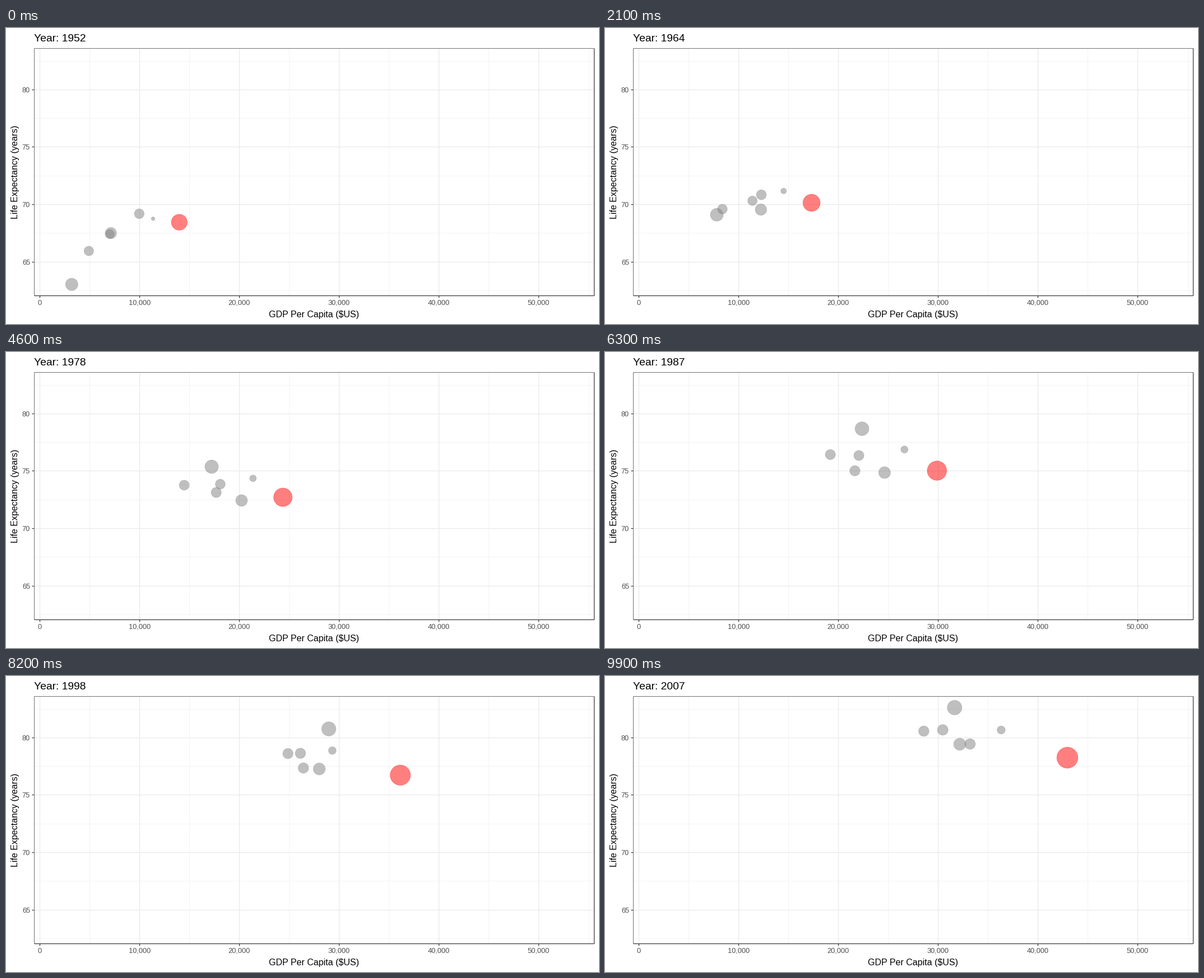
A matplotlib script that plays this animation: 1058x529 px, repeating every 10000 ms.

```python
import numpy as np
import matplotlib.pyplot as plt
from matplotlib.animation import FuncAnimation

W, H, DPI = 1058, 529, 64
FRAMES, INTERVAL = 100, 100
START, END = 1952, 2007
LEFT, RIGHT, TOP, BOTTOM = 50.2, 1049.3, 36.3, 478.3
X_MIN, X_MAX = -550, 55550
Y_MIN, Y_MAX = 62.051, 83.582
GREY, RED = (0.5, 0.5, 0.5), (1, 0, 0)

plt.rcParams["font.family"] = "Liberation Sans"
plt.rcParams["toolbar"] = "None"


def pt(px):
    return px * 72 / DPI


def px_x(v):
    return LEFT + (v - X_MIN) / (X_MAX - X_MIN) * (RIGHT - LEFT)


def px_y(v):
    return BOTTOM - (v - Y_MIN) / (Y_MAX - Y_MIN) * (BOTTOM - TOP)


class Country:
    """Key values joined by steady growth between the turning years."""
    gdp_years = (START, 1972, 1987, 1997, END)
    life_years = (START, 1972, 1987, END)
    slumps = np.array([1962, 1982, 1992])

    def __init__(self, gdp, life, people, slump=0, color=GREY):
        self.log_gdp, self.life, self.people = np.log(gdp), life, people
        self.slump, self.color = slump, color

    def x(self, t):
        depth = max(0, 1 - abs(self.slumps - t).min() / 5)
        return px_x(np.exp(np.interp(t, self.gdp_years, self.log_gdp)) - self.slump * depth)

    def y(self, t):
        return px_y(np.interp(t, self.life_years, self.life))

    def diameter(self, t):
        people = np.interp(t, (START, END), self.people)
        return 6.5 + 31.1 * np.sqrt((people - 14.8) / (301.1 - 14.8))


countries = [
    # Canada, France, Germany, Italy, Japan, United Kingdom, United States
    Country((11367, 18971, 26627, 28955, 36319), (68.75, 72.88, 76.86, 80.65), (14.8, 33.4), 1200),
    Country((7030, 16107, 22066, 25890, 30470), (67.41, 72.38, 76.34, 80.66), (42.5, 61.1)),
    Country((7144, 18016, 24639, 27789, 32170), (67.5, 71, 74.85, 79.41), (69.1, 82.4)),
    Country((4931, 12269, 19207, 24675, 28570), (65.94, 72.19, 76.42, 80.55), (47.7, 58.1)),
    Country((3217, 14779, 22376, 28817, 31656), (63.03, 73.42, 78.67, 82.6), (86.5, 127.5)),
    Country((9980, 15895, 21665, 26075, 33203), (69.18, 72.01, 75.01, 79.43), (50.4, 60.8), 1200),
    Country((13990, 21806, 29884, 35767, 42952), (68.44, 71.34, 75.02, 78.24), (157.6, 301.1), 1200, RED),
]

fig = plt.figure(figsize=(W / DPI, H / DPI), dpi=DPI, facecolor="white")
ax = fig.add_axes([0, 0, 1, 1])
ax.set_xlim(0, W)
ax.set_ylim(H, 0)
ax.axis("off")


def crisp(v):
    return np.round(v) + 0.5


def v_line(x, y0, y1, color, width, z):
    ax.plot([crisp(x)] * 2, [crisp(y0), crisp(y1)], color=color, lw=pt(width),
            solid_capstyle="butt", zorder=z, snap=False)


def h_line(y, x0, x1, color, width, z):
    ax.plot([crisp(x0), crisp(x1)], [crisp(y)] * 2, color=color, lw=pt(width),
            solid_capstyle="butt", zorder=z, snap=False)


def label(x, y, text, size, color="black", **kw):
    return ax.text(x, y, text, fontsize=pt(size), color=color, zorder=5,
                   va="baseline", parse_math=False, **kw)


for v in range(5000, 55001, 10000):
    v_line(px_x(v), TOP, BOTTOM, "#f3f3f3", 1, 1)
for v in np.arange(62.5, 83, 5):
    h_line(px_y(v), LEFT, RIGHT, "#f3f3f3", 1, 1)

for v in range(0, 50001, 10000):
    x = px_x(v)
    v_line(x, TOP, BOTTOM, "#ebebeb", 1.4, 2)
    v_line(x, BOTTOM, BOTTOM + 4, "#333333", 1.2, 4)
    label(x, 495, f"{v:,}", 12.8, "#4d4d4d", ha="center")
for v in range(65, 81, 5):
    y = px_y(v)
    h_line(y, LEFT, RIGHT, "#ebebeb", 1.4, 2)
    h_line(y, LEFT - 4, LEFT, "#333333", 1.2, 4)
    label(43, y + 5, str(v), 12.8, "#4d4d4d", ha="right")

v_line(LEFT, TOP, BOTTOM, "#707070", 1, 4)
h_line(TOP, LEFT, RIGHT, "#707070", 1, 4)
v_line(RIGHT, TOP, BOTTOM, "#333333", 1.2, 4)
h_line(BOTTOM, LEFT, RIGHT, "#333333", 1.2, 4)

label((LEFT + RIGHT) / 2, 517.5, "GDP Per Capita ($US)", 16, ha="center")
label(21, (TOP + BOTTOM) / 2, "Life Expectancy (years)", 16, rotation=90,
      ha="center", rotation_mode="anchor")
title = label(50, 24, "", 19.2, ha="left")

n = len(countries)
dots = ax.scatter(np.zeros(n), np.zeros(n), s=np.ones(n), linewidths=pt(1), zorder=3,
                  facecolors=[(*c.color, 0.5) for c in countries],
                  edgecolors=[(*c.color, 0.3) for c in countries])


def update(i):
    t = START + (END - START) * i / (FRAMES - 1)
    dots.set_offsets([(c.x(t), c.y(t)) for c in countries])
    dots.set_sizes([pt(c.diameter(t)) ** 2 for c in countries])
    title.set_text(f"Year: {round(t)}")
    return dots, title


anim = FuncAnimation(fig, update, frames=FRAMES, init_func=lambda: update(0),
                     interval=INTERVAL, repeat=True, repeat_delay=0, blit=False)
plt.show()
```
